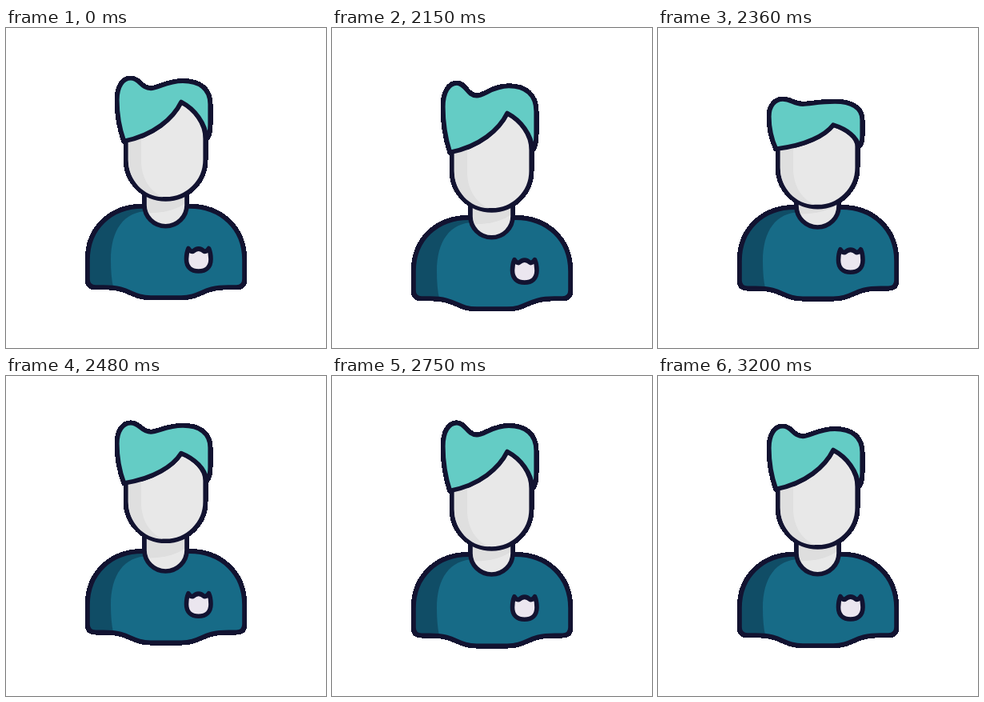
Write an HTML page that moves like this. It is 400 px wide and 400 px high and loops after 3830 ms.

```html
<!DOCTYPE html>
<html lang="en">
<head>
<meta charset="utf-8">
<title>Avatar nod</title>
<style>
  html, body { margin: 0; width: 100%; height: 100%; overflow: hidden; background: #fff; }
  svg { display: block; width: 100%; height: 100%; }
  .line { stroke: #121331; stroke-width: var(--w, 5.6); stroke-linejoin: round; stroke-linecap: round; }
  .rim { --w: 6.6; shape-rendering: crispEdges; }
</style>
</head>
<body>
<svg viewBox="0 0 400 400">
  <defs>
    <path id="torso" d="M102 290C102 250 131 223 171 223H229C269 223 298 250 298 290V314Q298 324 288 324H278C244 324 244 337 219 337H181C156 337 156 324 122 324H112Q102 324 102 314Z"/>
  </defs>
  <!-- slightly wider crisp copy behind hardens the outer edge -->
  <use href="#figure" class="rim"/>
  <g id="figure">
    <g id="body">
      <use href="#torso" fill="#176b87"/>
      <path fill="#104d66" d="M102 290C102 250 131 223 171 223L178 229C147 229 131 253 131 290Q131 310 134 324H112Q102 324 102 314Z"/>
      <use href="#torso" class="line" fill="none"/>
      <path class="line" fill="#ebe6ef" d="M228 275.500Q230 279.500 233.500 279.500Q240.700 272.500 248 279.500Q251 279.500 253.500 275.500Q256 281 256 289C256 299 250 304 240.700 304C231.500 304 225.500 299 225.500 289Q225.500 281 228 275.500Z"/>
      <path fill="#e8e8e8" d="M173 190V221.500a26.500 26.200 0 0 0 53 0V190Z"/>
      <path fill="#dedede" d="M173 190V231C195 232 214 228 226 217V190Z"/>
      <path class="line" fill="none" d="M173 205V221.500a26.500 26.200 0 0 0 53 0V205"/>
    </g>
    <path id="face" class="line" fill="#e8e8e8"/>
    <path id="shade" fill="#dfdfdf" d="M152.800 130H169V165C169 186 178 203 196 211.200C172 211 152.800 190 152.800 165Z"/>
    <path id="hair" class="line" fill="#64ccc5"/>
  </g>
</svg>
<script>
const LOOP = 3830, START = 2030, END = 3200, STEP = 30;
const $ = id => document.getElementById(id);

// Damped swing from `start`, brought fully to rest by END.
function spring(t, start, amp, half, decay) {
  const s = t - start;
  if (s <= 0 || t >= END) return 0;
  const fade = 1 - (s / (END - start)) ** 4;
  return amp * fade * Math.exp(-decay * s) * Math.sin(Math.PI * s / half);
}

// Smooth rise and fall from 0 to 1 and back.
function bump(t, from, to) {
  return t > from && t < to ? Math.sin(Math.PI * (t - from) / (to - from)) ** 2 : 0;
}

const drop = t => spring(t, 2024, 24.4, 355, .0035);

function draw(ms) {
  let t = ms % LOOP;
  t = t < START || t >= END ? 0 : START + Math.floor((t - START) / STEP) * STEP;

  // The head trails the body; the hair stretches, squashes and stretches again.
  const body = drop(t);
  const head = drop(t - 6) + spring(t, 2160, 14.4, 278, .0016);
  const top = 16.5 * bump(t, 2200, 2530) - 8 * bump(t, 2020, 2290) - 10 * bump(t, 2480, 2860);
  const peak = 19.3 * bump(t, 2150, 2610);

  const pt = (x, y, shift = 0) => `${x} ${(y + head + shift).toFixed(2)} `;
  const up = (x, y) => pt(x, y, top * Math.min(1, (141 - y) / 77));
  const low = (x, y) => pt(x, y, top * .6);
  const fr = (x, y, w) => pt(x, y, peak * w);

  const fringe = 'C' + fr(249.5, 119, .42) + fr(236, 101.5, .8) + fr(219, 92.5, 1) +
    'C' + fr(209, 113, .6) + fr(185, 134, .16) + pt(147.5, 141.5);
  const crown = 'C' + up(142, 126) + up(138.8, 108) + up(138.8, 90) +
    'C' + up(138.8, 73) + up(146, 62.8) + up(156, 62.8) +
    'C' + up(167, 62.8) + low(169, 75.5) + low(181, 75.5) +
    'C' + low(190, 75.5) + up(201, 66.3) + up(221, 66.3) +
    'C' + up(242, 66.3) + up(255.2, 76) + up(255.2, 95) +
    'L' + up(255.2, 121) + 'C' + up(255.2, 131) + pt(254, 135) + pt(250.8, 138.5);

  $('hair').setAttribute('d', 'M' + pt(147.5, 141.5) + crown + fringe + 'Z');
  $('face').setAttribute('d', 'M' + pt(249.2, 138.5) + fringe +
    'L' + pt(150, 141.5) + 'L' + pt(150, 164.7) +
    'A49.6 49.2 0 0 0 ' + pt(249.2, 164.7) + 'Z');
  $('shade').setAttribute('transform', `translate(0 ${head})`);
  $('body').setAttribute('transform', `translate(0 ${body})`);
}

const begin = performance.now();
function tick() {
  draw(performance.now() - begin);
  requestAnimationFrame(tick);
}
draw(0);
tick();
</script>
</body>
</html>
```
